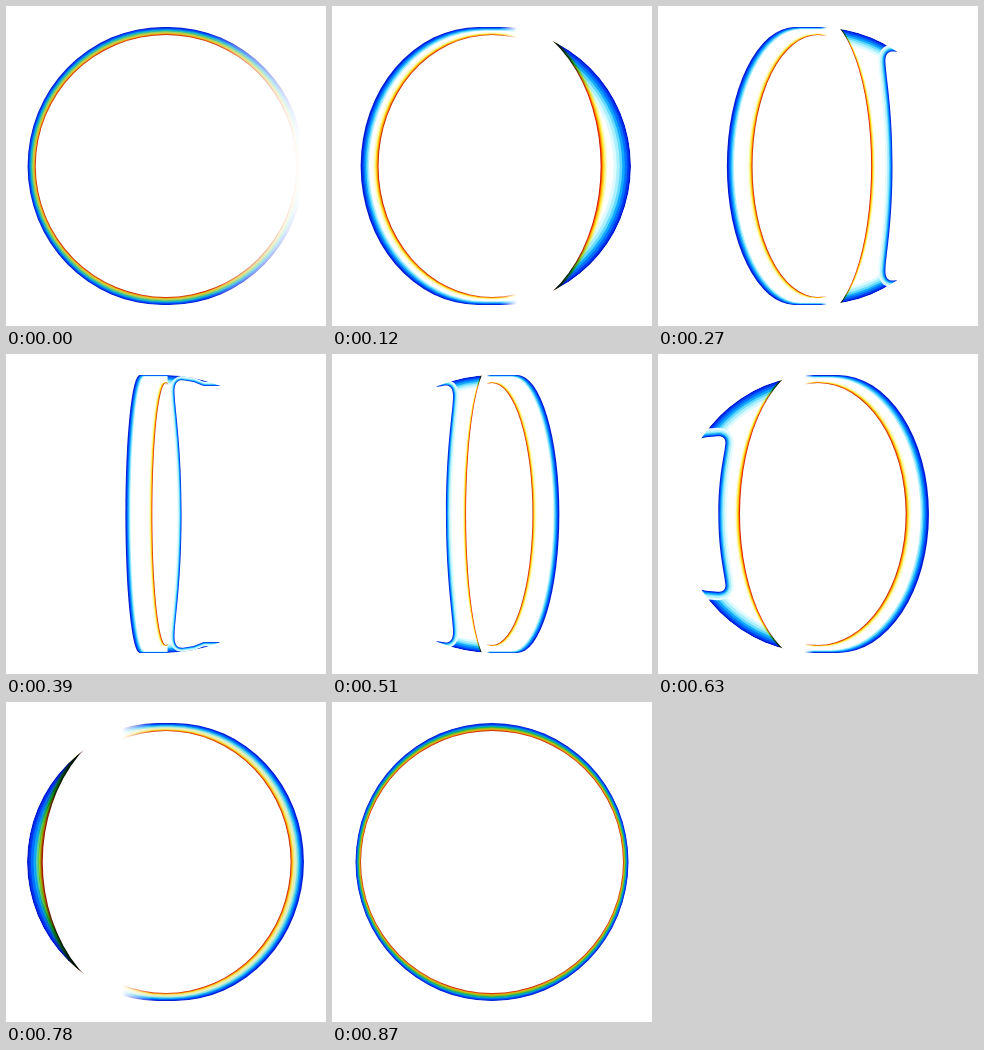
These frames come from a looping animation (320x320 px, 0.9 s). An HTML page without scripts:

```html
<!DOCTYPE html>
<html lang="en">
<head>
<meta charset="utf-8">
<title>Turning rainbow ring</title>
<style>
@property --turn { syntax: "<angle>"; inherits: true; initial-value: 6deg; }

html, body { margin: 0; width: 100%; height: 100%; overflow: hidden; background: #fff; }
svg {
  display: block; width: 100vw; height: 100vh;
  --cos: max(cos(var(--turn)), -1 * cos(var(--turn)));
  --sin: max(sin(var(--turn)), .003);
  --tight: calc(.35 + .75 * var(--cos) * var(--cos));
  --vivid: clamp(0%, var(--sin) * 250%, 100%);
  animation: turn .9s steps(30, end) infinite;
}
@keyframes turn { from { --turn: 6deg } to { --turn: 186deg } }

.ring { transform: scaleX(clamp(-1, (cos(var(--turn)) + .01) * 1000, 1)); }

/* Far side: rounded shapes nested from the blue rim (0) to the red rim (1) */
.far rect {
  --p: calc(var(--s) * var(--tight));
  --curve: calc((136.4 - 5.4 * var(--p)) * var(--cos));
  --reach: calc(var(--curve) + 26.5 * var(--sin) * (1 - var(--p)));
  --rise: calc(139 - 8 * var(--p));
  x: calc(-1px * var(--reach));
  y: calc(-1px * var(--rise));
  width: calc(2px * var(--reach));
  height: calc(2px * var(--rise));
  rx: calc(1px * var(--curve));
  ry: calc(1px * var(--rise));
  fill: color-mix(in srgb, var(--wide) var(--vivid), var(--thin, var(--wide)));
}
.far .warm { --p: calc(1 - (1 - var(--s)) * var(--tight)); }
.fade { transform: scaleX(calc(14 * var(--cos) / var(--sin) + 1)); }

/* Near side: bounded by the sphere outline */
.near { opacity: clamp(0, (var(--sin) - .105) * 100, 1); }
.near circle { r: calc(139px - 1px * var(--d) * (.5 + .6 * var(--cos))); }
.near ellipse {
  rx: max(0px, 1px * (136 * (var(--cos) * .9925 - var(--sin) * .1219) + var(--d) * var(--tight)));
  ry: 151px;
}
.near .warm { mix-blend-mode: multiply; }
.hole use {
  transform: translateX(calc(149px * var(--cos)))
    scaleY(calc(134 * sqrt(max(0, 1 - .82 * var(--cos) * var(--cos) / (var(--sin) * var(--sin))))));
  stroke-width: calc(2px * var(--d) * (.3 + .7 * var(--cos)));
  fill: none;
}
#gap { vector-effect: non-scaling-stroke; }
</style>
</head>
<body>
<svg viewBox="-160 -160 320 320">
  <defs>
    <linearGradient id="fadeOut">
      <stop offset=".3" stop-color="#fff"/>
      <stop offset="1" stop-color="#fff" stop-opacity="0"/>
    </linearGradient>
    <mask id="farEnd" maskUnits="userSpaceOnUse" x="-160" y="-160" width="320" height="320">
      <rect x="-160" y="-160" width="160.5" height="320" fill="#fff"/>
      <rect class="fade" y="-160" width="1" height="320" fill="url(#fadeOut)"/>
    </mask>
    <mask id="half" maskUnits="userSpaceOnUse" x="-160" y="-160" width="320" height="320">
      <path d="M0-139A139 139 0 0 1 0 139Z" fill="#fff"/>
    </mask>
    <path id="gap" d="M0 0C0 .5-6 .75-7 .9C-8 1-2 1.01 3 1L12 .99L22 .96H220V-.96H22L12-.99L3-1C-2-1.01-8-1-7-.9C-6-.75 0-.5 0 0Z"/>
  </defs>

  <g class="ring">
    <g class="near" mask="url(#half)">
      <circle style="--d:0" fill="#0018d0"/>
      <circle style="--d:1.5" fill="#0038f0"/>
      <circle style="--d:3.5" fill="#0070ff"/>
      <circle style="--d:6" fill="#10a8ff"/>
      <circle style="--d:8.5" fill="#60d8ff"/>
      <circle style="--d:11" fill="#a8efff"/>
      <circle style="--d:14" fill="#dcfaff"/>
      <circle style="--d:17" fill="#fff"/>
      <g class="hole">
        <use href="#gap" style="--d:11" stroke="#e4fbff"/>
        <use href="#gap" style="--d:8" stroke="#b0f0ff"/>
        <use href="#gap" style="--d:5.5" stroke="#60d8ff"/>
        <use href="#gap" style="--d:4" stroke="#10a8ff"/>
        <use href="#gap" style="--d:2.6" stroke="#0070ff"/>
        <use href="#gap" style="--d:1.4" stroke="#0028e0"/>
        <use href="#gap" style="fill:#fff"/>
      </g>
      <ellipse class="warm" style="--d:7.5" fill="#fffde0"/>
      <ellipse class="warm" style="--d:6" fill="#fff8a0"/>
      <ellipse class="warm" style="--d:4.3" fill="#ffe840"/>
      <ellipse class="warm" style="--d:2.9" fill="#ffc000"/>
      <ellipse class="warm" style="--d:1.9" fill="#f88000"/>
      <ellipse class="warm" style="--d:1" fill="#d84000"/>
      <ellipse style="--d:0" fill="#fff"/>
    </g>

    <g class="far" mask="url(#farEnd)">
      <rect style="--s:0; --wide:#0018d0"/>
      <rect style="--s:.08; --wide:#0038f0"/>
      <rect style="--s:.16; --wide:#0070ff; --thin:#0050e8"/>
      <rect style="--s:.25; --wide:#10a8ff; --thin:#0088e8"/>
      <rect style="--s:.34; --wide:#60d8ff; --thin:#00b0b0"/>
      <rect style="--s:.43; --wide:#b0f0ff; --thin:#20b060"/>
      <rect style="--s:.52; --wide:#fff; --thin:#50b830"/>
      <rect class="warm" style="--s:.64; --wide:#fffde0; --thin:#90c020"/>
      <rect class="warm" style="--s:.73; --wide:#fff8a0; --thin:#c8b818"/>
      <rect class="warm" style="--s:.81; --wide:#ffe030; --thin:#e0a010"/>
      <rect class="warm" style="--s:.87; --wide:#ffb000; --thin:#e07008"/>
      <rect class="warm" style="--s:.92; --wide:#f06000; --thin:#d84000"/>
      <rect class="warm" style="--s:.955; --wide:#c82000"/>
      <rect class="warm" style="--s:1; --wide:#fff"/>
    </g>
  </g>
</svg>
</body>
</html>
```
